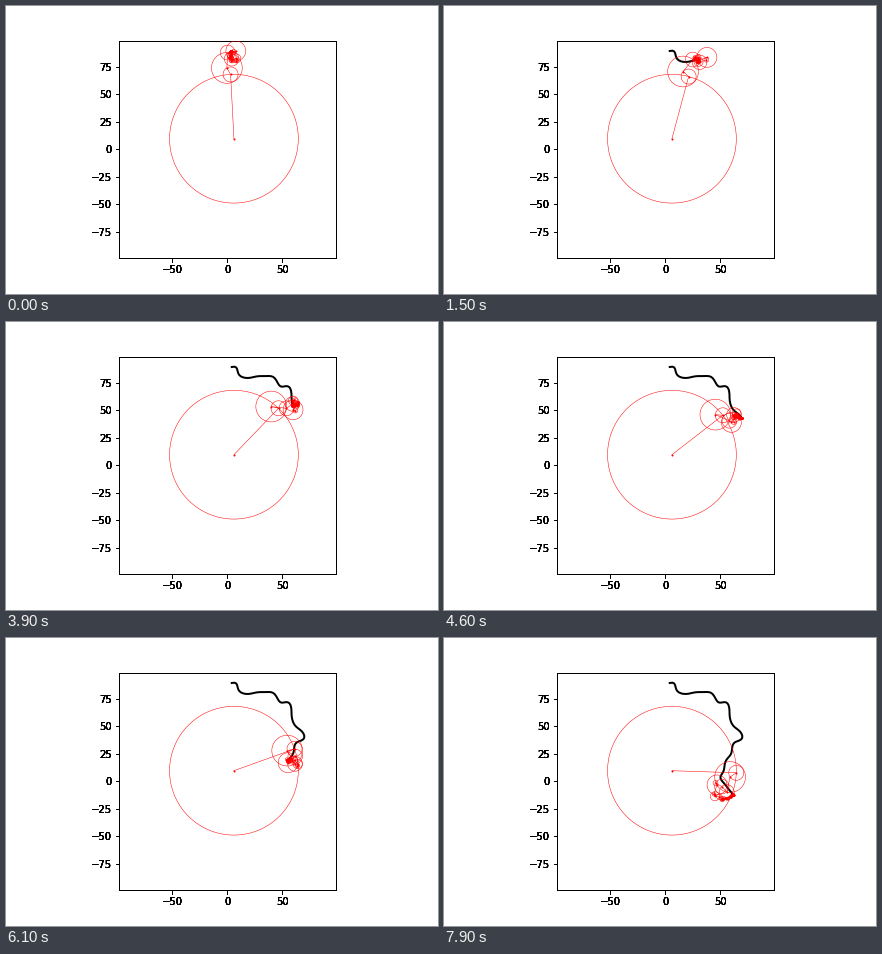
Write a matplotlib script that moves like this. It is 432 by 288 pixels and loops after 8 s.

```python
import matplotlib.pyplot as plt
import numpy as np
from matplotlib.animation import FuncAnimation
from matplotlib.collections import LineCollection

FRAMES, PERIOD = 80, 300   # shown steps, steps per full turn
TERMS = 40                 # highest frequency in each direction
LIMIT = 99

# Key points of the pen's path
KEYS = np.array([
    (4, 89.6), (9, 88.8), (9.5, 83.6), (16.5, 79.5), (28, 81), (40.5, 81),
    (44.5, 77), (49.8, 70.6), (54, 73), (57.8, 68), (59.8, 53.5), (68, 45),
    (70, 38.3), (62.6, 35.5), (60.3, 27), (54, 15.5), (52.3, 6),
    (49.6, 3.6), (61.4, -12)]) @ (1, 1j)

# Radius and starting angle of the big wheels, in drawing order
BIG = [(11.1, 57.7), (58.4, 92.8), (6.8, 121), (14, 86), (6.7, -58), (6.7, 74)]


def spline(p, n=20):
    """Catmull-Rom curve through the points p."""
    p = np.r_[2 * p[0] - p[1], p, 2 * p[-1] - p[-2]]
    a, b, c, d = (p[i:len(p) - 3 + i, None] for i in range(4))
    t = np.linspace(0, 1, n, endpoint=False)
    curve = b + t * ((c - a) / 2 + t * (a - 2.5 * b + 2 * c - d / 2
                                        + t * (1.5 * (b - c) + (d - a) / 2)))
    return np.r_[curve.ravel(), p[-2]]


def walk(points, n):
    """n points at constant speed along a polyline."""
    s = np.r_[0, np.cumsum(abs(np.diff(points)))]
    return np.interp(np.linspace(0, s[-1], n), s, points)


def fit(freqs, basis, path):
    """Random small wheels, corrected so that the chain's tip follows path."""
    rng = np.random.default_rng(3)
    tol = 28 / np.maximum(abs(freqs), 1) ** 1.5
    mean = tol * 0.6 * (rng.normal(size=len(freqs))
                        + 1j * rng.normal(size=len(freqs)))
    r, deg = np.transpose(BIG)
    mean[:len(BIG)] = r * np.exp(1j * np.deg2rad(deg))
    tol[:len(BIG)] = 0.2
    gain = tol[:, None] ** 2 * basis.conj().T
    cov = basis @ gain + 0.02 * np.eye(len(path))
    return mean + gain @ np.linalg.solve(cov, path - basis @ mean)


freqs = np.array([0] + [s * k for k in range(1, TERMS + 1) for s in (-1, 1)])
basis = np.exp(2j * np.pi * np.outer(np.arange(FRAMES), freqs) / PERIOD)
coefs = fit(freqs, basis, walk(spline(KEYS), FRAMES))
joints = np.cumsum(basis * coefs, axis=1)
radii = abs(coefs[1:])
ring = np.exp(1j * np.linspace(0, 2 * np.pi, 121))

plt.rcParams.update({"font.family": "DejaVu Sans", "font.size": 10})
fig = plt.figure(figsize=(6, 4), dpi=72, facecolor="white")


def add_frame():
    side = 217.44
    ax = fig.add_axes([112.68 / 432, 36 / 288, side / 432, side / 288],
                      facecolor="none")
    ax.set(xlim=(-LIMIT, LIMIT), ylim=(-LIMIT, LIMIT),
           xticks=(-50, 0, 50), yticks=range(-75, 76, 25))
    return ax


# Stacked copies give the labels their heavy, hard edges
ax = [add_frame() for _ in range(6)][-1]

trace, = ax.plot([], [], "k-", lw=2, zorder=2)
circles = ax.add_collection(
    LineCollection([], colors="red", linewidths=0.5, zorder=3), autolim=False)
arms, = ax.plot([], [], "r-", lw=0.5, marker="o", ms=2, mew=0, zorder=4)


def draw(n):
    chain, tip = joints[n], joints[:n + 1, -1]
    trace.set_data(tip.real, tip.imag)
    arms.set_data(chain.real, chain.imag)
    rims = chain[:-1, None] + radii[:, None] * ring
    circles.set_segments(np.stack([rims.real, rims.imag], axis=-1))
    return trace, circles, arms


anim = FuncAnimation(fig, draw, frames=FRAMES, interval=100,
                     repeat=True, repeat_delay=0)
plt.show()
```
